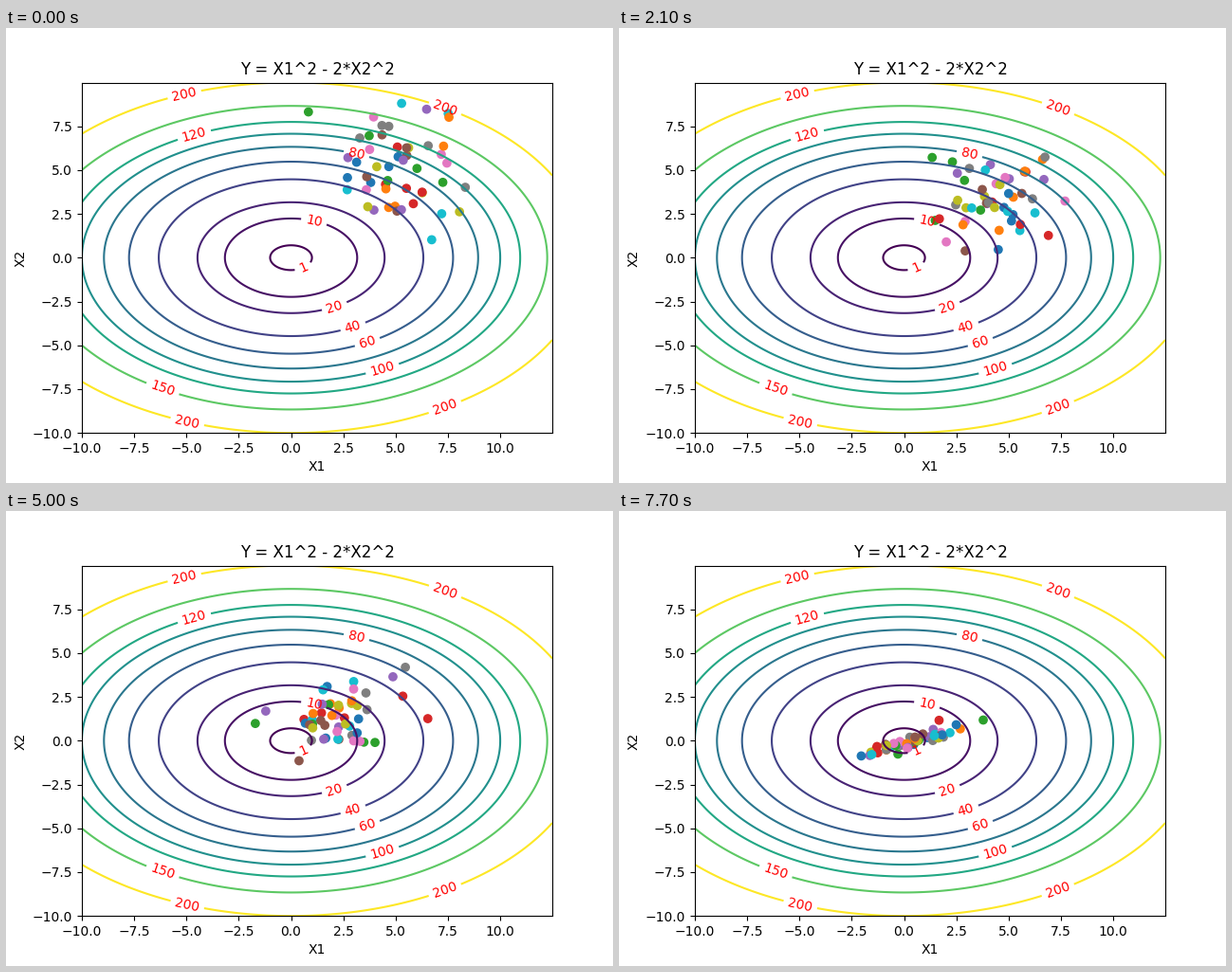
Recreate the animation shown at these times as a matplotlib script. Size 640 px wide and 480 px high, loop 7800 ms.

```python
import matplotlib.pyplot as plt
import numpy as np
from matplotlib.animation import FuncAnimation

FRAMES, INTERVAL = 78, 100
STEP = 0.01
LEVELS = [1, 10, 20, 40, 60, 80, 100, 120, 150, 200]
COLORS = [f"C{i % 10}" for i in range(50)]


def population(frame):
    """Fresh Gaussian sample; the cloud drifts to the origin and flattens."""
    t = frame / (FRAMES - 1)
    mean_x = 4.9 - 4.3 * t**1.4
    mean_y = 5.1 * (1 - t)**1.35
    sd_x = 1.75 - 0.55 * t
    sd_y = 1.85 - 1.4 * t**1.7
    rho = 0.87 * t**4
    u, v = np.random.default_rng(frame).standard_normal((2, len(COLORS)))
    return np.column_stack([
        mean_x + sd_x * u,
        mean_y + sd_y * (rho * u + np.sqrt(1 - rho**2) * v),
    ])


def update(frame):
    dots.set_offsets(population(frame))
    return dots,


fig, ax = plt.subplots(figsize=(6.4, 4.8), dpi=100)
x = np.arange(-10, 12.5, STEP)
y = np.arange(-10, 10, STEP)
X, Y = np.meshgrid(x, y)

curves = ax.contour(X, Y, X**2 + 2 * Y**2, LEVELS)
ax.set(xlim=(x[0], x[-1]), ylim=(y[0], y[-1]),
       xlabel="X1", ylabel="X2", title="Y = X1^2 - 2*X2^2")
ax.clabel(curves, fmt="%d", colors="red", fontsize=10)

ax.autoscale(False)
dots = ax.scatter(*population(0).T, c=COLORS)

anim = FuncAnimation(fig, update, frames=FRAMES, interval=INTERVAL,
                     repeat=True, repeat_delay=0)
plt.show()
```
